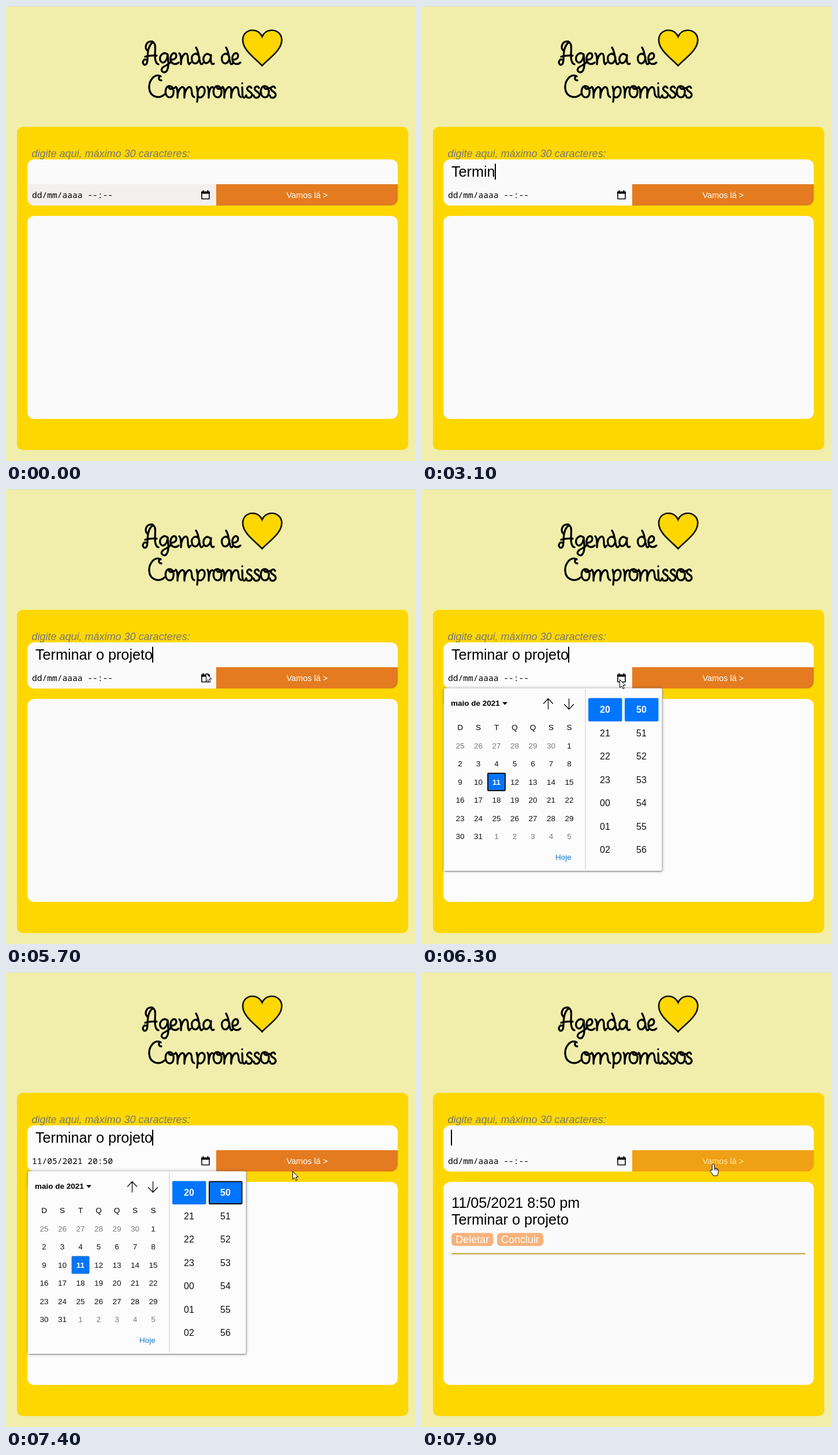
An HTML page for the animation above (8000 ms loop, 710 by 789 pixels).

```html
<!DOCTYPE html>
<html lang="pt-BR">
<head>
<meta charset="utf-8">
<title>Agenda</title>
<style>
html, body { margin: 0; width: 100%; height: 100%; overflow: hidden; background: #f0eeaa; }
svg { display: block; width: 710px; height: 789px; font-family: "Liberation Sans", Arial, sans-serif; --paper: #fafafa; }
.paper { fill: var(--paper); }
.big { font-size: 25.2px; }
.mid { text-anchor: middle; }
.day { font-size: 13.5px; }
.time { font-size: 16px; }
.bold { font-weight: bold; }
.line { fill: none; stroke: #000; stroke-linecap: round; stroke-linejoin: round; }
.pointer { fill: #fff; stroke: #000; stroke-linejoin: round; }
#popup { filter: drop-shadow(0 0 2.5px #0006) drop-shadow(1px 2px 0 #ccc); }
</style>
</head>
<body>
<svg viewBox="0 0 710 789">
  <rect width="710" height="1" fill="#dedfe0"/>
  <g id="title" class="line" stroke-width="3.3"></g>
  <path d="M443.500 103.500C432 91 410 77 410 59C410 48 418 42 427 42C435 42 441 47 443.500 53C446 47 452 42 460 42C470 42 477.500 49 477.500 59C477.500 77 455 91 443.500 103.500Z" fill="#ffd700" stroke="#111" stroke-width="2.700"/>

  <rect x="19" y="209.500" width="677.500" height="560.500" rx="10" fill="#ffd700"/>
  <text x="44.500" y="262" font-size="18" font-style="italic" fill="#777">digite aqui, máximo 30 caracteres:</text>
  <path class="paper" d="M37 309V278a12 12 0 0 1 12-12H666.500a12 12 0 0 1 12 12V309Z"/>
  <path id="dateBox" class="paper" d="M37 309H364V346H49a12 12 0 0 1-12-12Z"/>
  <path id="button" d="M364 309H678.500V334a12 12 0 0 1-12 12H364Z"/>
  <text id="buttonText" class="mid" x="521.500" y="333" font-size="14.400">Vamos lá &gt;</text>
  <text id="date" x="45" y="333" font-size="14.600" font-family="'Noto Sans Mono', 'DejaVu Sans Mono', monospace"></text>
  <path d="M339 323h13v11.500h-13z" class="line" stroke-width="1.600"/>
  <path d="M338 321.500h15v4h-15zM340.500 319.500h2v3h-2zM348.500 319.500h2v3h-2z"/>
  <text id="typed" class="big" x="51" y="296"></text>
  <rect id="caret" y="273.500" width="2" height="27.500"/>
  <rect class="paper" x="37" y="364" width="641.500" height="352" rx="12"/>

  <g id="item">
    <text class="big" x="51" y="408.500">11/05/2021 8:50 pm</text>
    <text class="big" x="51" y="437.500">Terminar o projeto</text>
    <g fill="#f7b27b">
      <rect x="51" y="452.500" width="72.500" height="22.500" rx="6"/>
      <rect x="130" y="452.500" width="80" height="22.500" rx="6"/>
    </g>
    <g class="mid" font-size="18" fill="#fff">
      <text x="87.300" y="470">Deletar</text>
      <text x="170" y="470">Concluir</text>
    </g>
    <rect x="51" y="487.500" width="613" height="2" fill="#c2a224"/>
  </g>

  <g id="popup">
    <rect x="38" y="345.500" width="377.500" height="316.500" rx="2" fill="#fcfcfc"/>
    <rect x="282.500" y="347" width="1" height="313" fill="#ccc"/>
    <text class="day bold" x="50" y="376">maio de 2021</text>
    <path d="M139 369.500h9l-4.500 5z"/>
    <path class="line" stroke-width="1.200" d="M218.500 382V364m-8 8l8-8.500l8 8.500M254.500 363.500V381.500m-8-8l8 8.500l8-8.500"/>
    <g fill="#0075ff" stroke-width="2">
      <rect id="daySel" x="114" y="493" width="30" height="30" rx="1"/>
      <rect x="288" y="362.500" width="58.500" height="40.500" rx="2"/>
      <rect id="minuteSel" x="352" y="363.500" width="56.500" height="38.500" rx="1"/>
    </g>
    <g id="cells"></g>
    <text class="day" x="231" y="642.500" fill="#1476d4">Hoje</text>
  </g>

  <path id="beam" class="line" stroke-width="1" d="M-3-9h2.500l.5.500l.5-.500H3M0-8.500V8.500M-3 9h2.500l.5-.500l.5.500H3"/>
  <path id="arrow" class="pointer" d="M.5.5V14.500L3.700 11.500L6 16.500L8.200 15.500L6 10.500H10Z"/>
  <path id="hand" class="pointer" d="M4.500 12V2.800a1.900 1.900 0 0 1 3.800 0V8l5 1.200q2 .6 2 2.600q0 5.500-2 9.500H6.300Q4 16.500 .6 13q0-2.500 3.900-1zM8.300 8v4M10.800 8.700v3.500M13.200 9.300v3"/>
</svg>
<script>
const $ = id => document.getElementById(id);
const show = (id, on) => $(id).style.display = on ? '' : 'none';

// Handwritten title: glyph strokes relative to their baseline
const glyphs = {
  A: 'M6-8C1-10-1 0 4 1C11 1 8-12 10-23C12-33 17-39 20-37C24-34 22-24 22-15C22-6 24-1 28 0M10-23C4-26 5-36 12-39C16-40 19-39 20-37M5-13C12-16 19-15 25-15',
  g: 'M13-17C6-23-2-15 0-7C3 1 12-3 13-17C14-5 16 7 10 13C5 16 0 11 4 6C8 2 14 2 18-4',
  e: 'M1-8C8-7 13-12 10-18C6-22 0-16 1-8C2 1 11 1 15-3',
  n: 'M0-19C4-16 3-7 3 0C3-11 8-21 13-18C17-15 13-3 17 0L20-3',
  d: 'M14-15C8-22 0-16 2-7C4 2 14 0 15-12M9-29C14-22 14-10 16-4C17 1 19 1 21-2',
  a: 'M13-15C7-22 0-15 1-7C3 2 13-1 14-16C13-5 14 2 19-1',
  C: 'M22-30C16-30 17-38 21-37C11-43 0-30 1-17C2-1 18 3 28-6',
  o: 'M8-20C1-21-1-12 1-6C4 2 13 1 14-8C15-15 12-20 7-20C4-16 9-13 16-17',
  m: 'M0-19C4-16 3-7 3 0C3-11 8-20 13-18C17-16 14-6 15 0C15-11 20-20 25-18C30-15 25-3 32-1',
  p: 'M1-19C4-12 3 0 2 7M3-10C5-20 13-22 15-14C16-4 8 3 4-2',
  r: 'M1-19C4-16 3-7 3 0C3-11 6-20 10-18',
  i: 'M2-18C3-10 1-1 5 0C7 0 8-2 9-4M2-25v.1',
  s: 'M10-17C7-22 1-18 3-14C5-10 12-10 11-4C9 2 1 1 1-4'
};
const write = (word, y, xs) => [...word].map((c, i) =>
  `<path transform="translate(${xs[i]} ${y})" d="${glyphs[c]}"/>`).join('');
$('title').innerHTML =
  write('Agendade', 101, [236, 267, 284, 300, 320, 341, 372, 391]) +
  write('Compromissos', 159, [247, 276, 294, 329, 348, 359, 375, 407, 415, 428, 441, 456]);

// Calendar grid and time columns
const cell = (x, y, label, kind, extra = '') =>
  `<text class="mid ${kind}" x="${x}" y="${y + (kind[0] === 'd' ? 4.8 : 5.8)}" ${extra}>${label}</text>`;
let cells = [...'DSTQQSS'].map((c, i) => cell(66 + i * 31.5, 413.5, c, 'day')).join('');
for (let i = 0; i < 42; i++) {
  const n = i < 6 ? 25 + i : i < 37 ? i - 5 : i - 36;
  const chosen = i === 16;
  const fill = chosen ? '#fff' : i < 6 || i > 36 ? '#7a7a7a' : '#111';
  cells += cell(66 + i % 7 * 31.5, 445 + Math.floor(i / 7) * 31.5, n, chosen ? 'day bold' : 'day', `fill="${fill}"`);
}
for (let i = 0; i < 7; i++) {
  const kind = i ? 'time' : 'time bold', fill = `fill="${i ? '#111' : '#fff'}"`;
  const hour = String((20 + i) % 24).padStart(2, '0');
  cells += cell(317, 382.5 + i * 40.5, hour, kind, fill) + cell(380, 382.5 + i * 40.5, 50 + i, kind, fill);
}
$('cells').innerHTML = cells;

const text = 'Terminar o projeto';
// [time, characters typed]
const keys = [[0, 0], [2300, 1], [2500, 2], [2600, 3], [2900, 4], [3000, 5], [3100, 6], [3200, 8], [3400, 10],
  [3700, 12], [4200, 13], [4300, 14], [4500, 15], [4600, 16], [4700, 17], [4800, 18], [7900, 0]];
// [time, x, y]
const path = [[200, 57, 62], [800, 87, 266], [5700, 346, 319], [5900, 346, 324], [6100, 342, 330], [6300, 342, 330],
  [6600, 362, 424], [6800, 378, 388], [7000, 378, 388], [7400, 496, 345], [7600, 499, 340], [7900, 498, 332]];

const mix = (a, b, k) => a + (b - a) * k;
const blend = (a, b, k) => `rgb(${a.map((v, i) => Math.round(mix(v, b[i], k)))})`;
const last = (list, t) => list.filter(e => e[0] <= t).pop();
const within = (t, a, b) => t >= a && t < b;
const place = (id, x, y) => $(id).setAttribute('transform', `translate(${x} ${y})`);

function mouse(t) {
  const a = last(path, t) || path[0];
  const b = path[path.indexOf(a) + 1] || a;
  const k = a === b ? 0 : Math.max(0, (t - a[0]) / (b[0] - a[0]));
  return [mix(a[1], b[1], k), mix(a[2], b[2], k)];
}

function draw(t) {
  const open = within(t, 6300, 7600), picked = within(t, 7000, 7900);
  document.querySelector('svg').style.setProperty('--paper', open ? '#fcfcfc' : '#fafafa');
  $('dateBox').style.fill = t < 1600 ? '#f4efef' : '';

  $('typed').textContent = text.slice(0, last(keys, t)[1]);
  const width = $('typed').textContent ? $('typed').getComputedTextLength() : 0;
  $('caret').setAttribute('x', 50 + Math.round(width));
  show('caret', t >= 1100 && !within(t, 1600, 2000) && !within(t, 5300, 5700));
  $('date').textContent = picked ? '11/05/2021 20:50' : 'dd/mm/aaaa --:--';

  show('popup', open);
  $('daySel').setAttribute('stroke', picked ? '#3c78b4' : '#111');
  $('daySel').setAttribute('stroke-width', picked ? 1 : 2);
  $('minuteSel').setAttribute('stroke', picked ? '#111' : '#0075ff');

  const hover = Math.min(1, Math.max(0, (t - 7500) / 300));
  $('button').style.fill = blend([228, 123, 32], [240, 160, 20], hover);
  $('buttonText').style.fill = blend([255, 255, 255], [252, 232, 170], hover);
  show('item', t >= 7900);

  place('arrow', ...mouse(t));
  place('hand', ...mouse(t));
  show('arrow', within(t, 200, 1000) || within(t, 5700, 7600));
  show('hand', t >= 7600);
  const hidden = t >= 1300;
  place('beam', hidden ? 220 : 99.5, hidden ? 303 : 271);
  $('beam').style.stroke = hidden ? '#eee' : '#e8e4d8';
  show('beam', within(t, 1000, 1600));
}

const start = performance.now();
function tick() {
  const t = (performance.now() - start) % 8000;
  draw(Math.floor(t / 100) * 100);
  requestAnimationFrame(tick);
}
tick();
</script>
</body>
</html>
```
